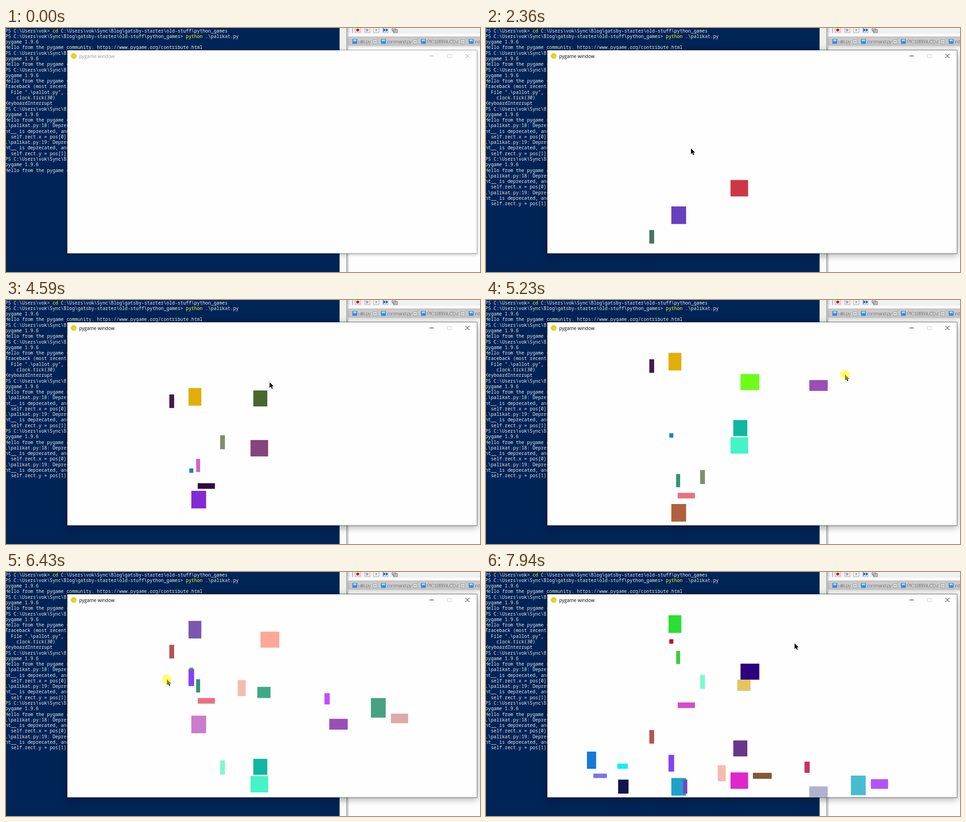
These frames come from a looping animation (1043x537 px, 8000 ms). An HTML page with a canvas:

```html
<!DOCTYPE html>
<html lang="en">
<head>
<meta charset="utf-8">
<title>pygame window</title>
<style>
  html, body { margin: 0; width: 100%; height: 100%; overflow: hidden; background: #fdfdfd; }
  #stage { position: relative; width: 1043px; height: 537px; overflow: hidden; }
  #stage > * { position: absolute; }
  #desk, #view { left: 0; top: 0; display: block; }
  #desk text { white-space: pre; }
  #term { font: 10.2px "Noto Sans Mono", "DejaVu Sans Mono", monospace; fill: #eeedf0; }
  #term .cmd { fill: #ffff30; }
  #tabs { font: 11px "Liberation Sans", Arial, sans-serif; letter-spacing: -.9px; fill: #858585; }
  #win {
    left: 134px; top: 48px; width: 901px; height: 447px;
    border: 1px solid rgba(0, 0, 0, .34); background: #fefefe padding-box;
    box-shadow: 0 2px 6px rgba(0, 0, 0, .22);
    color: #999; font: 10.3px/26px "Open Sans", "Noto Sans", sans-serif;
  }
  #win.active { color: #000; border-color: rgba(0, 0, 0, .55); box-shadow: 0 3px 15px rgba(0, 0, 0, .33); }
  #win span { position: absolute; left: 26px; top: 0; white-space: pre; }
  #win svg { position: absolute; left: 0; top: 0; }
</style>
</head>
<body>
<div id="stage">
  <svg id="desk" width="1043" height="537">
    <defs>
      <linearGradient id="fade"><stop stop-color="#bdbdbd"/><stop offset="1" stop-color="#bdbdbd" stop-opacity="0"/></linearGradient>
      <clipPath id="editor"><path d="M750 0h293v60h-293z"/></clipPath>
    </defs>
    <rect width="734" height="537" fill="#012456"/>
    <g id="term"></g>
    <rect x="734" width="16" height="537" fill="#f0f0f0"/>
    <rect x="735" y="508" width="14" height="29" fill="#fafafa"/>
    <rect x="750" width="293" height="44" fill="#f0f0f0"/>
    <rect x="750" y="12" width="293" height="7" fill="#fafafa"/>
    <path d="M751 1q4 3 0 8z" fill="#e0b040"/>
    <path d="M762.5 0v11" stroke="#8a8a8a"/>
    <g fill="#fff" stroke="#9a9a9a">
      <path d="M768.5 -1h11v11h-11zM789.5 -1h11v11h-11zM809.5 -1h11v11h-11zM829.5 -1h11v11h-11z"/>
      <path d="M849.5 -1h8v8h-8zM852.5 3.500h9v7h-9z" fill="#ccc" stroke="#777"/>
    </g>
    <circle cx="774" cy="4.500" r="3.300" fill="#d80d16"/>
    <path d="M791.500 1.500h6v6h-6z" fill="#aaa"/>
    <path d="M813 0.500l5 4-5 4z" fill="#aaa"/>
    <path d="M830.500 0l5 4.500-5 4.500zM835.500 0l5 4.500-5 4.500z" fill="#2463c4"/>
    <g id="tabs" clip-path="url(#editor)"></g>
    <path d="M750 39.500h293" stroke="#d9d9d9" stroke-width="3"/>
    <rect x="750" width="6" height="537" fill="url(#fade)"/>
    <path d="M749.500 0v537" stroke="#8f8f8f"/>
  </svg>
  <div id="win">
    <span>pygame window</span>
    <svg width="901" height="27" fill="none" stroke="currentColor">
      <circle cx="14" cy="12.500" r="6.500" fill="#e6cf36" stroke="none"/>
      <path d="M797 12.500h9M876 8l9 9m0 -9l-9 9"/>
      <path d="M836.500 8.500h8v8h-8z" stroke="#ccc"/>
    </svg>
  </div>
  <canvas id="view" width="1043" height="537"></canvas>
</div>
<script>
const SVG = 'http://www.w3.org/2000/svg';
const $ = id => document.getElementById(id);

function add(parent, tag, attrs, text = '') {
  const el = document.createElementNS(SVG, tag);
  for (const name in attrs) el.setAttribute(name, attrs[name]);
  el.textContent = text;
  return parent.appendChild(el);
}

// ---- terminal ----
const dir = 'C:\\Users\\vok\\Sync\\Blog\\gatsby-starter\\old-stuff\\python_games';
const prompt = `PS ${dir}> `;
const hello = ['pygame 1.9.6', 'Hello from the pygame community. https://www.pygame.org/contribute.html'];
const warn = ['x', 'y'].flatMap((axis, i) => [
  `.\\palikat.py:${18 + i}: DeprecationWar`,
  'nt__ is deprecated, and',
  `  self.rect.${axis} = pos[${i}]`
]);
const lines = [
  ['PS C:\\Users\\vok> ', 'cd', ' ' + dir], [prompt, 'python', ' .\\palikat.py'],
  ...hello, prompt, ...hello, prompt, ...hello,
  'Traceback (most recent call', '  File ".\\pallot.py", line', '    clock.tick(30)', 'KeyboardInterrupt',
  prompt, ...hello, ...warn, prompt, ...hello
];

function printLine(parent, line, row) {
  const [head, cmd, tail] = [].concat(line);
  const el = add(parent, 'text', { x: -1.5, y: 9.6 + 12.28 * row }, head);
  if (cmd) {
    add(el, 'tspan', { class: 'cmd' }, cmd);
    add(el, 'tspan', {}, tail);
  }
}
lines.forEach((line, i) => printLine($('term'), line, i));
const late = add($('term'), 'g', {});
warn.forEach((line, i) => printLine(late, line, lines.length + i));

// ---- editor tabs ----
function tab(x, width, label) {
  const g = $('tabs'), cx = x + width - 8;
  add(g, 'rect', { x: x + .5, y: 19.5, width: width - 1, height: 18, fill: '#cbcbcb', stroke: '#a9a9a9' });
  if (label) {
    add(g, 'rect', { x: x + 4, y: 24, width: 11, height: 11, rx: 1, fill: '#3f8fd6' });
    add(g, 'rect', { x: x + 6, y: 25, width: 7, height: 4, fill: '#a9d3f5' });
    add(g, 'text', { x: x + 17, y: 33.5 }, label);
  }
  add(g, 'path', {
    d: `M${cx - 4.5} 25.500h9v9h-9zM${cx - 2} 28l4 4m0 -4l-4 4`, fill: '#dedede', stroke: '#999'
  });
}
tab(739, 18, '');
tab(758, 62, 'utils.py');
tab(821, 87, 'command.py');
tab(909, 104, 'PIC16f884LCD.c');
tab(1014, 70, 'index.js');

// ---- blocks: equal speed, a new colour at every bounce ----
const blocks = [];
function block(x, w, h, born, y, color, ...turns) {
  blocks.push({ x, w, h, born, y, color, turns });
}
block(359.4, 10.6, 30, 9, 267, '#457567', [467, '#47184f'], [72, '#b25550']);
block(407.6, 32.5, 38.7, 15, 274, '#6640c0', [458, '#3c9a70'], [390, '#00d5df'], [456, '#c08a3a'],
  [397, '#802bd6'], [456, '#5a7ad0'], [432, '#b0603c'], [456, '#cb7ccd'], [291, '#1ea2cb']);
block(538.1, 38.7, 36, 22, 285.5, '#cf3645', [462, '#87437b'], [266.5, '#43f5c6'], [459, '#6f9a50'],
  [451, '#c07a48'], [459, '#bab93c'], [388, '#5d70b8'], [460, '#e025cb']);
block(421.6, 37.8, 12.3, 29, 267, '#3f8f9c', [380, '#6a4734'], [317.5, '#2f0945'], [452.5, '#e67282'], [188.5, '#d44cca']);
block(403.1, 8.8, 9.7, 37, 237, '#bd08ea', [395, '#1085c2'], [178.5, '#58a05e'], [244, '#9a9447'], [118.7, '#be0526']);
block(401.6, 28.2, 38.7, 40, 218, '#c91e27', [282, '#e0ae05'], [70.5, '#399b3c'], [140, '#7a58b0'],
  [73.5, '#d6be32'], [118.5, '#4888c0'], [73, '#a8643c'], [115.5, '#27e030']);
block(418.1, 8.8, 29, 41, 207, '#d063d0', [405, '#369173'], [156, '#8868c0'], [166, '#b88a40'], [121, '#42cb3f']);
block(471.5, 10.6, 30.8, 46, 205, '#7f8f6e', [468, '#7df9cc']);
block(544.1, 30.8, 35.2, 52, 168, '#47672e', [240.5, '#a06a9c'], [234.5, '#0fb7a0'], [426, '#4ba04e'],
  [355, '#3f78b0'], [361, '#b05a50'], [318, '#6a3689']);
block(560.1, 41.4, 35.2, 57, 177, '#4f88c8', [199, '#6cfe18'], [73.5, '#ffa796'], [260, '#2c007e']);
block(711.8, 40.5, 23.8, 61, 157, '#9a4eb6', [471, '#60a878'], [451.5, '#b2b0cd']);
block(803, 32.5, 43, 64, 140, '#47a183', [456.5, '#45bdd1']);
block(847, 37.8, 21, 66, 193.3, '#dda9aa', [477.5, '#b453f4']);
block(701.2, 11.4, 24.6, 71, 197, '#cb47fc', [435.5, '#cb3063']);
block(553.1, 29, 24.6, 73, 203, '#3ea988', [338.5, '#e5c462']);
block(510, 17.6, 35.2, 75, 208, '#f6bbb0');
block(401.6, 12.3, 37, 77, 204.5, '#8243f4');
block(289, 23, 11.4, 79, 244, '#11eefa');
block(222.5, 20.3, 37.8, 81, 238, '#1279da');
block(236.5, 30, 9.7, 83, 305.8, '#7c74e2');
block(291, 23, 30.8, 86, 349, '#11144c');
block(433, 9.7, 30.8, 88, 368.5, '#7448bc');
block(587.1, 41.4, 13.2, 91, 383, '#875832');

// value of a piecewise linear track of [step, ...values]
function track(keys, k) {
  let i = 1;
  while (i < keys.length - 1 && keys[i][0] < k) i++;
  const a = keys[i - 1], b = keys[i], p = (k - a[0]) / (b[0] - a[0]);
  return a.slice(1).map((v, n) => v + (b[n + 1] - v) * p);
}

const travel = [[0, 0], [27, 267], [43, 425], [55, 548], [70, 693], [85, 842], [97, 960]];
const distance = k => track(travel, k)[0];

// the pointer visits the middle of every block as it is made
const pointer = [
  [0, 345, 300], [21, 523, 285], [27, 451, 265], [43, 435, 221],
  [55, 580, 181], [70, 675, 204], [85, 311, 367], [97, 679, 157],
  ...blocks.map(b => [b.born, b.x + b.w / 2, b.y + b.h / 2])
].sort((a, b) => a[0] - b[0]);

function pose(b, k) {
  let { y, color } = b, left = distance(k) - distance(b.born), way = 1;
  for (const [stop, next] of b.turns) {
    const len = Math.abs(stop - y);
    if (left < len) break;
    left -= len;
    y = stop;
    color = next;
    way = -way;
  }
  return { y: y + way * left, color };
}

// ---- drawing ----
const LEFT = 135, TOP = 75, SCALE = .88;
const ctx = $('view').getContext('2d');
const arrow = new Path2D('M0 0v12.500l2.900 -2.700 2.200 4.700 2 -.9 -2.200 -4.600h4z');

// the game runs in whole pixels and is shown a little smaller
const px = v => Math.round(v / SCALE);

function draw(k) {
  $('win').className = k >= 0 ? 'active' : '';
  late.style.display = k >= 9 ? '' : 'none';
  ctx.clearRect(0, 0, 1043, 537);
  if (k < 0) return;

  ctx.save();
  ctx.beginPath();
  ctx.rect(LEFT, TOP, 901, 421);
  ctx.clip();
  ctx.translate(LEFT, TOP);
  ctx.scale(SCALE, SCALE);
  for (const b of blocks) {
    if (k < b.born) continue;
    const { y, color } = pose(b, k);
    ctx.fillStyle = color;
    ctx.fillRect(px(b.x - LEFT), px(y - TOP), px(b.w), px(b.h));
  }
  ctx.restore();

  const [x, y] = track(pointer, k);
  ctx.save();
  ctx.translate(Math.round(x), Math.round(y));
  ctx.strokeStyle = '#fff';
  ctx.lineWidth = 1.5;
  ctx.stroke(arrow);
  ctx.fillStyle = '#000';
  ctx.fill(arrow);
  if (blocks.some(b => b.born === k + 1)) {
    ctx.fillStyle = 'rgba(255, 255, 0, .55)';
    ctx.beginPath();
    ctx.arc(0, 0, 10.5, 0, 7);
    ctx.fill();
  }
  ctx.restore();
}

const LOOP = 8000, STEP = 79.69;
let shown = null;
function tick() {
  const t = performance.now() % LOOP;
  const k = t < 210 ? -1 : Math.min(97, Math.floor((t - 197) / STEP));
  if (k !== shown) draw(shown = k);
  requestAnimationFrame(tick);
}
tick();
</script>
</body>
</html>
```
